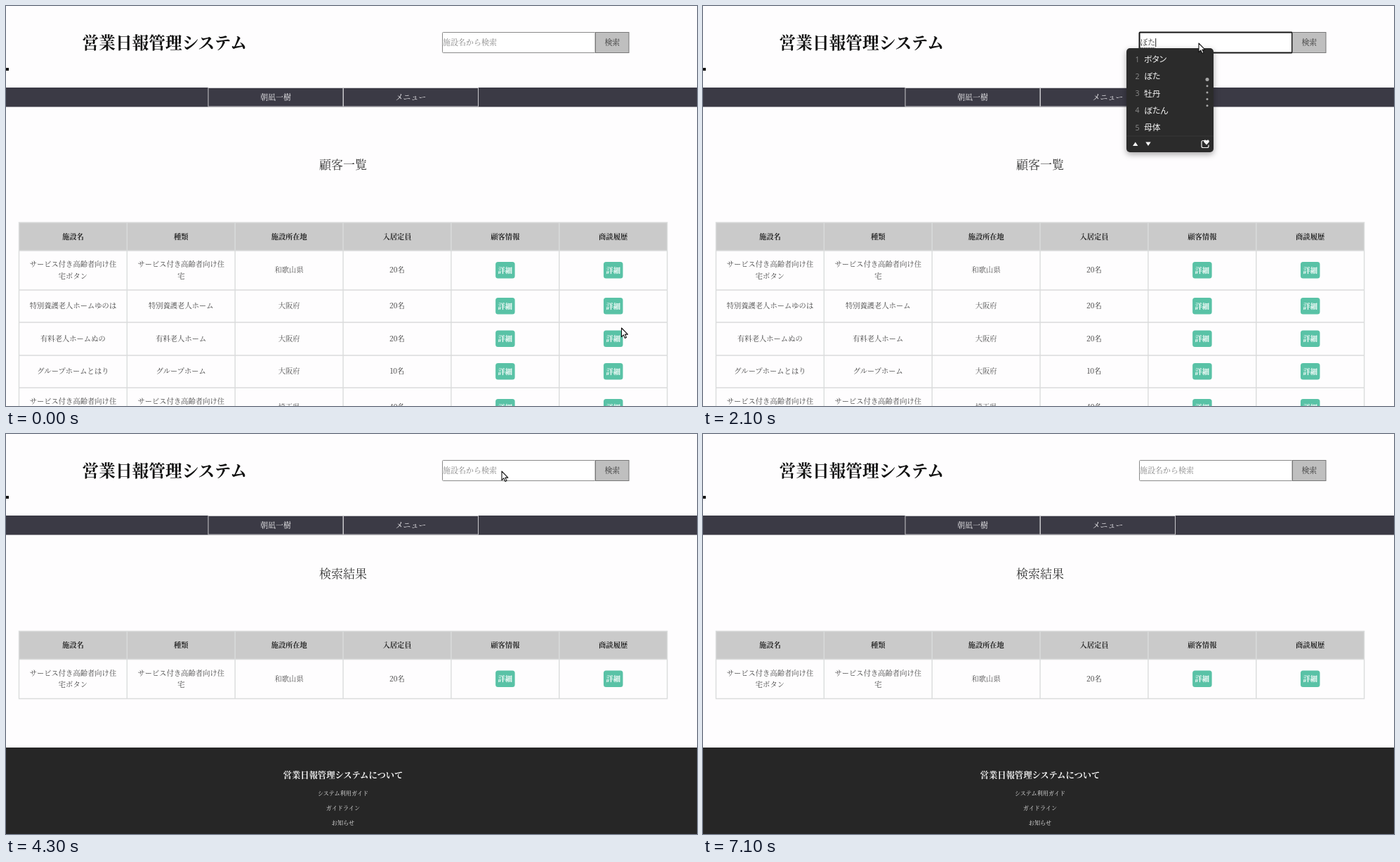
Recreate the animation shown at these times as an HTML page. Size 984 by 569 pixels, loop 7.2 s.

```html
<!DOCTYPE html>
<html lang="ja">
<head>
<meta charset="utf-8">
<title>営業日報管理システム</title>
<style>
html, body { margin: 0; width: 100%; height: 100%; overflow: hidden; background: #fefdfe; }
svg { display: block; width: 984px; height: 569px; }
text { font-family: "Noto Serif CJK JP", "Noto Serif JP", "Noto Serif", "Noto Sans CJK JP", "Noto Sans CJK", serif; }
.ime text { font-family: "Open Sans", "Noto Sans CJK JP", "Noto Sans CJK", sans-serif; font-feature-settings: "palt"; }
</style>
</head>
<body>
<svg id="stage" viewBox="0 0 984 569" xmlns="http://www.w3.org/2000/svg"></svg>
<script>
const LOOP = 7200, STEP = 100;
const stage = document.getElementById('stage');

function el(parent, tag, attrs = {}, content) {
  const node = document.createElementNS('http://www.w3.org/2000/svg', tag);
  for (const key in attrs) node.setAttribute(key, attrs[key]);
  if (content !== undefined) node.textContent = content;
  parent.appendChild(node);
  return node;
}
const group = (parent, attrs) => el(parent, 'g', attrs);
const rect = (parent, x, y, width, height, fill, more) =>
  el(parent, 'rect', { x, y, width, height, fill, ...more });
// cy is the middle of the line of text
const label = (parent, x, cy, size, str, fill, more) =>
  el(parent, 'text', { x, y: cy + size * 0.38, 'font-size': size, fill, ...more }, str);
const centred = (parent, x, cy, size, str, fill, weight = 400) =>
  label(parent, x, cy, size, str, fill, { 'text-anchor': 'middle', 'font-weight': weight });
const show = (node, on) => node.setAttribute('visibility', on ? 'inherit' : 'hidden');

// ---------- header and navigation ----------
rect(stage, 0, 0, 984, 569, '#fefdfe');
rect(stage, 0, 88, 4, 4, '#111');
label(stage, 108.5, 51.5, 23.7, '営業日報管理システム', '#111', { 'font-weight': 600 });

rect(stage, 0, 116, 984, 27.5, '#3b3a45');
for (const [x, name] of [[288, '朝凪一樹'], [480.5, 'メニュー']]) {
  rect(stage, x, 116.5, 192, 26.5, 'none', { stroke: '#c9c8cc' });
  centred(stage, x + 96, 129.5, 10.9, name, '#f6f5f7');
}

// ---------- search form ----------
const field = rect(stage, 621.5, 37.5, 217.5, 29, '#fff', { rx: 1 });
rect(stage, 839.5, 37.5, 47.5, 29, '#bfbfbf', { stroke: '#777' });
const button = centred(stage, 863.3, 52, 10.9, '検索', '#333');
const hint = label(stage, 622, 52, 11, '施設名から検索', '#858585');
const typed = label(stage, 622.5, 52, 10.8, '', '#333');
const underline = el(stage, 'path', { fill: 'none', stroke: '#444' });
const caret = rect(stage, 632, 46, 1, 12, '#222');

// ---------- tables ----------
const LEFT = 18.5, COL = 153.85;
const HEADS = ['施設名', '種類', '施設所在地', '入居定員', '顧客情報', '商談履歴'];
const SERVICE = 'サービス付き高齢者向け住';
const ROWS = [
  [56, [SERVICE, '宅ボタン'], [SERVICE, '宅'], '和歌山県', '20名'],
  [46, ['特別養護老人ホームゆのは'], ['特別養護老人ホーム'], '大阪府', '20名'],
  [47, ['有料老人ホームぬの'], ['有料老人ホーム'], '大阪府', '20名'],
  [46, ['グループホームとはり'], ['グループホーム'], '大阪府', '10名'],
  [56, [SERVICE, '宅ミノリ'], [SERVICE, '宅'], '埼玉県', '40名']
];
const colMid = i => LEFT + COL * (i + 0.5);

function table(parent, top, rows) {
  const width = COL * 6;
  const lines = [top, top + 40];
  rect(parent, LEFT, top, width, 40, '#cacaca');
  HEADS.forEach((h, i) => centred(parent, colMid(i), top + 20, 10.3, h, '#222', 600));
  let y = top + 40;
  for (const [height, name, kind, place, seats] of rows) {
    const mid = y + height / 2 - 0.5;
    [name, kind].forEach((cell, i) => cell.forEach((line, n) =>
      centred(parent, colMid(i), mid + (n - (cell.length - 1) / 2) * 16.5, 10.3, line, '#444')));
    centred(parent, colMid(2), mid, 10.3, place, '#555');
    centred(parent, colMid(3), mid, 10.3, seats, '#333');
    for (const i of [4, 5]) {
      rect(parent, colMid(i) - 13.7, mid - 11.5, 27.5, 23.5, '#59c2a6', { rx: 3.5 });
      centred(parent, colMid(i), mid + 0.3, 10.3, '詳細', '#fff', 700);
    }
    y += height;
    lines.push(y);
  }
  let d = lines.map(v => `M${LEFT - 0.7} ${v}h${width + 1.4}`).join('');
  for (let i = 0; i <= 6; i++) d += `M${LEFT + COL * i} ${top}V${y}`;
  el(parent, 'path', { d, fill: 'none', stroke: '#dadcdc', 'stroke-width': 1.4 });
}

const listPage = group(stage);
centred(listPage, 480, 225.5, 17, '顧客一覧', '#333');
table(listPage, 308, ROWS);

const resultPage = group(stage);
centred(resultPage, 480, 198.5, 17, '検索結果', '#333');
table(resultPage, 280.5, ROWS.slice(0, 1));
rect(resultPage, 0, 446, 984, 123, '#262626');
centred(resultPage, 480, 485, 12.3, '営業日報管理システムについて', '#f7f7f7', 600);
['システム利用ガイド', 'ガイドライン', 'お知らせ'].forEach((s, i) =>
  centred(resultPage, 480, 511 + i * 20.8, 8.15, s, '#f2f2f2'));

// ---------- input candidates ----------
const ime = group(stage, { class: 'ime' });
const panel = rect(ime, 603, 60, 124, 148, '#2b2b2b',
  { rx: 5, style: 'filter:drop-shadow(0 3px 4px rgba(0,0,0,.35))' });
const rule = rect(ime, 603, 184.5, 124, 1, '#383838');
const words = [];
for (let i = 0; i < 5; i++) {
  const y = 75.6 + i * 24.3;
  label(ime, 615.5, y, 10.5, i + 1, '#8d8d8d');
  words.push(label(ime, 628, y, 11.8, '', '#f4f4f4'));
}
el(ime, 'path', { d: 'M612 199l3.7-5.5 3.7 5.5zM630.3 193.5h7.4l-3.7 5.5z', fill: '#f4f4f4' });
const side = group(ime);
for (let i = 0; i < 5; i++)
  el(side, 'circle', { cx: 718, cy: 104.5 + i * 9.3, r: i ? 1.5 : 2.5, fill: '#a8a8a8' });
el(side, 'path', {
  d: 'M714 191.5h-2q-2 0-2 2v6q0 2 2 2h6q2 0 2-2v-2',
  fill: 'none', stroke: '#f4f4f4', 'stroke-width': 1.2
});
el(side, 'path', {
  d: 'M717 197.5l-3.3-3.4c-1.8-2.2 1-5 3.3-2.6 2.3-2.4 5.1.4 3.3 2.6z', fill: '#f4f4f4'
});

// ---------- pointer ----------
const pointer = el(stage, 'path', {
  d: 'M0 0V12.6L2.9 9.9 4.9 14.5 7 13.6 5 9.1H8.9Z',
  fill: '#fff', stroke: '#111', 'stroke-width': 1.1, 'stroke-linejoin': 'round'
});

// ---------- timeline ----------
const FOCUS = 800, CLOSE = 3200, CONVERT = 3600, CONFIRM = 3800, SEND = 4100, RESULT = 4300;
const PATH = [
  [0, 876.5, 458], [700, 706, 53], [4700, 706, 53],
  [5500, 70, 366], [5900, 154, 368.5], [6300, 420, 372], [7000, 992, 350]
];
// start time, text, candidates
const TYPING = [
  [1500, 'b', 'blue book before blog blood'],
  [1700, 'ぼ', '僕 ぼく 募集 棒 ボール'],
  [1900, 'ぼt', '僕 ぼく 募集 棒 ボール'],
  [2100, 'ぼた', 'ボタン ぼた 牡丹 ぼたん 母体'],
  [2300, 'ぼたん', 'ぼたん ボタン 牡丹雪 ボタン穴 牡丹'],
  [CONVERT, 'ボタン', '']
];

function pointerAt(t) {
  let i = 0;
  while (i < PATH.length - 2 && t >= PATH[i + 1][0]) i++;
  const [t0, x0, y0] = PATH[i], [t1, x1, y1] = PATH[i + 1];
  const p = Math.min(1, (t - t0) / (t1 - t0));
  const e = p * p * (3 - 2 * p);
  return [x0 + (x1 - x0) * e, y0 + (y1 - y0) * e];
}

function render(time) {
  const t = Math.floor((time % LOOP) / STEP) * STEP;
  const done = t >= RESULT;
  const focused = t >= FOCUS && !done;
  const entry = done ? undefined : TYPING.filter(k => t >= k[0]).pop();
  const text = entry ? entry[1] : '';

  show(listPage, !done);
  show(resultPage, done);
  field.setAttribute('stroke', focused ? '#151515' : '#8a8a8a');
  field.setAttribute('stroke-width', focused ? 2 : 1);
  button.setAttribute('fill', t >= SEND && !done ? '#979797' : '#333');
  show(hint, !text);
  typed.textContent = text;
  typed.setAttribute('x', text === 'b' ? 625 : 622.5);

  const end = text === 'b' ? 632 : 622.5 + text.length * 10.6;
  const converted = t >= CLOSE;
  underline.setAttribute('d', `M623 59.5H${t >= CONFIRM ? 633 : end}`);
  underline.setAttribute('stroke-dasharray', converted && t < CONFIRM ? 'none' : '1.5 1');
  show(underline, !!text);
  caret.setAttribute('x', text ? end + 0.5 : 623);
  show(caret, focused && !converted && (text ? t < 2500 : t % 1000 < 500));

  const open = !!entry && !converted;
  show(ime, open);
  if (open) {
    const extra = t >= 2300 ? 3 : 0;
    entry[2].split(' ').forEach((w, i) => words[i].textContent = w);
    panel.setAttribute('width', 124 + extra);
    rule.setAttribute('width', 124 + extra);
    side.setAttribute('transform', `translate(${extra} 0)`);
  }

  const [x, y] = pointerAt(t);
  pointer.setAttribute('transform', `translate(${x.toFixed(2)} ${y.toFixed(2)})`);
}

const begin = performance.now();
function tick() {
  render(performance.now() - begin);
  requestAnimationFrame(tick);
}
tick();
</script>
</body>
</html>
```
